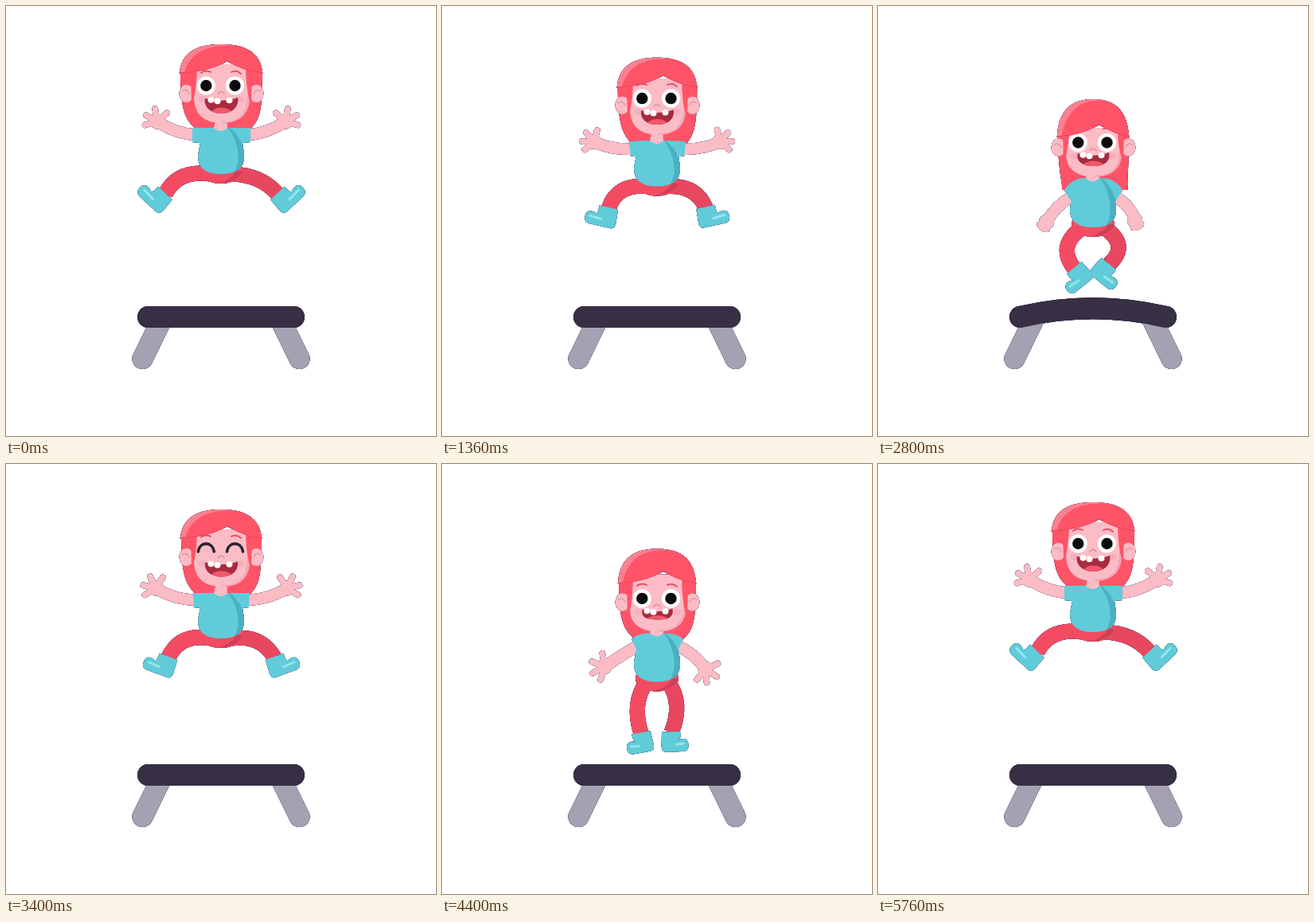
An HTML page with a canvas for the animation above (5.8 s loop, 540 px wide and 540 px high).

```html
<!DOCTYPE html>
<html lang="en">
<head>
<meta charset="utf-8">
<title>Trampoline</title>
<style>
html, body { margin: 0; width: 100%; height: 100%; overflow: hidden; background: #fff; }
canvas { display: block; width: 540px; height: 540px; filter: drop-shadow(0 0 .5px #3b3065) drop-shadow(0 0 .4px #3b3065); }
</style>
</head>
<body>
<canvas id="stage" width="540" height="540"></canvas>
<script>
const ctx = document.getElementById('stage').getContext('2d');
const LOOP = 5800, JUMP = 1910, LAND = 580, DEEP = 720, LIFT = 885;
const MIRROR = 541;
const C = {
  hair: '#ff5468', hairLight: '#fb8190', hairDark: '#e8455d', skin: '#fbbcc6', skinDark: '#e597a6',
  shirt: '#60ccd9', shirtDark: '#4bb0c2', shoeLight: '#93e5ed',
  pants: '#f34c62', pantsDark: '#d13e58', mouth: '#a92b40', tongue: '#ef586b',
  bar: '#372f43', leg: '#a5a0b2', black: '#0b0a0d'
};

// head: hair top, fringe peak, fringe half width, eyes, mouth, mouth height, hair bottom, hair corner x
// body: collar, hem; sleeve: outer and lower corner, relative to the collar
// arms: bend x, y, palm x, y, turn; hand: spread, finger length
// knees: bend x, y; feet: ankle x, y, turn, toe length. The second limb is given mirrored.
const both = v => [v, v];
const POSES = {
  top: {
    head: [48, 69, 52, 100, 125, 20, 154, 238], body: [153, 211], sleeve: [-36, 0, -36, 18],
    arms: both([214, 161, 190, 145, 0]), hand: [1, 19], knees: [[216, 205], [221, 212]],
    feet: both([200, 235, 43, 28])
  },
  fall: {
    head: [106, 134, 49, 168.5, 188, 14, 220, 243], body: [212, 273], sleeve: [-32, 7, -25, 22],
    arms: [[226, 239, 204, 254, -57], [223, 238, 210, 257, -114]], hand: [1, 20], knees: both([238, 300]),
    feet: [[250, 337, -10, 21], [253, 336, 2, 21]]
  },
  deep: {
    head: [152, 184, 46, 208, 228, 15, 264, 236], body: [253, 313], sleeve: [-36, 10, -29, 26],
    arms: both([221, 282, 210, 304, -118]), hand: [.6, 13], knees: both([218, 340]),
    feet: both([250, 375, -4, 23])
  },
  lift: {
    head: [118, 150, 45, 172.5, 193.5, 17, 232, 231], body: [217, 279], sleeve: [-36, 15, -27, 30],
    arms: [[223, 252, 212, 273, -118], [223, 252, 219, 271, -128]], hand: [.45, 12], knees: both([224, 302]),
    feet: [[247, 330, -40, 25], [252, 325, -40, 25]]
  },
  rise: {
    head: [57, 78, 51, 108, 132, 19, 163, 238], body: [162, 219], sleeve: [-35, 0, -34, 18],
    arms: both([212, 171, 188, 156, -16]), hand: [1, 19], knees: [[219, 212], [221, 214]],
    feet: both([204, 242, 20, 27])
  }
};

function mix(a, b, k) {
  if (typeof a === 'number') return a + (b - a) * k;
  if (Array.isArray(a)) return a.map((v, i) => mix(v, b[i], k));
  return Object.fromEntries(Object.keys(a).map(key => [key, mix(a[key], b[key], k)]));
}

function poseAt(t) {
  const P = POSES;
  if (t < LAND) return mix(P.top, P.fall, (t / LAND) ** 2);
  if (t < DEEP) return mix(P.fall, P.deep, Math.sin((t - LAND) / (DEEP - LAND) * Math.PI / 2));
  if (t < LIFT) return mix(P.deep, P.lift, 1 - Math.cos((t - DEEP) / (LIFT - DEEP) * Math.PI / 2));
  const k = 1 - (1 - (t - LIFT) / (JUMP - LIFT)) ** 2.3, near = .871;
  return k < near ? mix(P.lift, P.rise, k / near) : mix(P.rise, P.top, (k - near) / (1 - near));
}

function bendAt(t) {
  const x = t - 605, after = x - 230;
  if (x < 0) return 0;
  if (after < 0) return 24 * Math.sin(Math.PI * x / 230);
  return -20 * Math.exp(-after / 90) * Math.sin(Math.PI * after / 115);
}

function fill(d, color) {
  ctx.fillStyle = color;
  ctx.fill(new Path2D(d));
}

function line(d, color, width, cap = 'round') {
  ctx.strokeStyle = color;
  ctx.lineWidth = width;
  ctx.lineCap = cap;
  ctx.stroke(new Path2D(d));
}

function oval(x, y, rx, ry, color) {
  ctx.fillStyle = color;
  ctx.beginPath();
  ctx.ellipse(x, y, rx, ry, 0, 0, 7);
  ctx.fill();
}

function scoped(draw) {
  ctx.save();
  draw();
  ctx.restore();
}

function inside(d, draw) {
  scoped(() => { ctx.clip(new Path2D(d)); draw(); });
}

function eachSide(draw) {
  [0, 1].forEach(side => scoped(() => {
    if (side) { ctx.translate(MIRROR, 0); ctx.scale(-1, 1); }
    draw(side);
  }));
}

function trampoline(bend) {
  line('M194,397L171.5,443', C.leg, 26);
  line('M346,397L368.5,443', C.leg, 26);
  line(`M178.5,390.5Q270,${390.5 + bend * 2} 361.5,390.5`, C.bar, 27);
}

function arm(p, side) {
  const [bx, by, px, py, turn] = p.arms[side];
  const [ax, ay, lx, ly] = p.sleeve, [spread, len] = p.hand;
  const sx = 272 + (ax + lx) / 2, sy = p.body[0] + (ay + ly) / 2;
  line(`M${sx + 4},${sy}Q${bx},${by} ${px},${py}`, C.skin, 14.5);
  oval(px, py, 9.5, 9.5, C.skin);
  [-74, -29, 22, 81].forEach(a => {
    const r = (238 + turn + a * spread) * Math.PI / 180;
    line(`M${px},${py}l${Math.cos(r) * (len - 3)},${Math.sin(r) * (len - 3)}`, C.skin, 7.5);
  });
}

function leg(p, side) {
  const [x, y, turn, toe] = p.feet[side], [kx, ky] = p.knees[side], hem = p.body[1];
  line(`M257,${hem}Q${kx},${ky} ${x},${y + 1}`, side ? '#e8485f' : C.pants, 19, 'butt');
  scoped(() => {
    ctx.translate(x, y);
    ctx.rotate(turn * Math.PI / 180);
    fill(`M-12,0L12,0L13,18Q13,25 7,25L${8 - toe},25Q${-toe},25 ${-toe},17
      Q${-toe},9 ${7 - toe},9Q${11 - toe},9 ${14 - toe},11Q-12,10 -12,0Z`, C.shirt);
    line(`M${6 - toe},15L-6,16`, C.shoeLight, 3);
  });
}

function body(p) {
  const [sh, hem] = p.body, [ax, ay, lx, ly] = p.sleeve, hip = hem + 12;
  oval(270, hem - 4, 27, 16, C.pants);
  fill(`M297,${hem - 4}Q293,${hip - 2} 266,${hip}Q286,${hip - 7} 288,${hem - 4}Z`, C.pantsDark);
  const shirt = `M259,${sh}Q${280 + ax},${sh} ${270 + ax},${sh + ay}L${270 + lx},${sh + ly}L244,${sh + 19}
    L241,${hem - 24}Q240,${hem} 270,${hem}Q300,${hem} 299,${hem - 24}L297,${sh + 19}
    L${271 - lx},${sh + ly}L${271 - ax},${sh + ay}Q${261 - ax},${sh} 282,${sh}Z`;
  fill(shirt, C.shirt);
  inside(shirt, () => fill(`M279,${sh}C293,${sh + 20} 296,${hem - 14} 285,${hem}
    L300,${hem}L300,${hem - 24}Q298,${sh + 14} 281,${sh}Z`, C.shirtDark));
  fill(`M264,${sh - 12}L277,${sh - 12}L278,${sh}Q270,${sh + 8} 261,${sh}Z`, C.skin);
}

function eyes(y, open, happy) {
  [251.3, 287.5].forEach(x => {
    if (happy) {
      line(`M${x - 10},${y + 2}C${x - 8},${y - 11} ${x + 8},${y - 11} ${x + 10},${y + 2}`, '#292331', 3.6);
      return;
    }
    if (open < 1) oval(x, y, 11.6, 11.6, C.skinDark);
    const h = 12 * open;
    inside(`M${x - 14},${y - h}h28v${2 * h}h-28Z`, () => {
      oval(x, y, 11.6, 11.6, '#fff');
      oval(x, y, 7.2, 7.2, C.black);
    });
  });
}

function mouth(y, h) {
  const w = 15 + h * .28, m = 270.5, up = y - h / 2, low = y + h / 2;
  const d = `M${m - w},${up + 1}Q${m},${up + 7} ${m + w},${up}
    C${m + w + 2},${up + 11} ${m + 14},${low} ${m},${low}C${m - 14},${low} ${m - w - 2},${up + 11} ${m - w},${up + 1}Z`;
  fill(d, C.mouth);
  inside(d, () => oval(m, low, 13, h * .38, C.tongue));
  [[-13, 3], [-5, 4.5], [10, 3.5]].forEach(([x, dy]) => oval(m + x, up + dy, 4, 3.8, '#fff'));
}

function backHair(p) {
  const [, peak, w, , , , low, corner] = p.head;
  const x = 271 - w, y = peak + 12, mid = (y + low) / 2;
  fill(`M${x},${y}C${x},${mid + 14} ${x + 6},${low - 12} ${corner},${low}L${545 - corner},${low}
    C${538 - x},${low - 12} ${541 - x},${mid + 14} ${541 - x},${y}Z`, C.hair);
}

function head(p, open, happy) {
  const [top, peak, w, eye, my, mh] = p.head, chin = my + 22, ear = my - 15;
  const L = 270 - w, R = 270 + w, e = peak + 15;
  eachSide(() => {
    oval(226.5, ear, 9, 11, C.skin);
    line(`M221,${ear - 3}Q227,${ear - 7} 230,${ear}`, C.skinDark, 1.5);
  });
  const face = `M237,${peak + 4}L236,${eye + 13}C236,${chin - 8} 252,${chin} 271,${chin}
    C290,${chin} 306,${chin - 8} 306,${eye + 13}L305,${peak + 4}Z`;
  fill(face, C.skin);
  inside(face, () => line(`M305,${eye + 10}C305,${chin - 7} 291,${chin} 273,${chin}`, '#efa9b6', 4));
  eachSide(() => fill(`M232,${e - 6}L240,${e - 6}Q239,${eye + 12} 233,${eye + 24}Z`, C.hair));
  oval(247, eye + 17, 6, 4, '#f6b0bb');
  oval(294, eye + 17, 6, 4, '#f6b0bb');
  line(`M245,${eye - 16}Q250,${eye - 20} 257,${eye - 17}M283,${eye - 17}Q290,${eye - 20} 295,${eye - 15}`, C.hairDark, 1.8);
  eyes(eye, open, happy);
  line(`M266,${eye + 10}Q270,${eye + 5} 274,${eye + 10}`, C.skinDark, 1.8);
  mouth(my, mh);

  const cap = `M${L},${e}C${L + 2},${top + 10} ${L + 22},${top} 270,${top}
    C${R - 22},${top} ${R - 2},${top + 10} ${R},${e}Q297,${peak + 12} 278,${peak}
    Q254,${peak + 14} ${L},${e}Z`;
  fill(cap, C.hairLight);
  inside(cap, () => fill(`M${L + 5},${e + 4}C${L + 10},${top + 14} ${L + 30},${top + 3} 272,${top + 2}
    L${R + 4},${top}L${R + 4},${e + 4}Z`, C.hair));
  line(`M${R},${e}Q297,${peak + 12} 278,${peak}Q254,${peak + 14} ${L},${e}`, C.hairDark, 1);
}

function draw(time) {
  const t = time < 3 * JUMP ? time % JUMP : 0;
  const p = poseAt(t);
  const open = Math.min(1, .08 + Math.abs(time - 920) / 120);
  const happy = time > 3000 && time < 3760;
  ctx.clearRect(0, 0, 540, 540);
  trampoline(bendAt(t));
  backHair(p);
  eachSide(side => arm(p, side));
  eachSide(side => leg(p, side));
  body(p);
  head(p, open, happy);
}

function tick() {
  draw(performance.now() % LOOP);
  requestAnimationFrame(tick);
}
tick();
</script>
</body>
</html>
```
